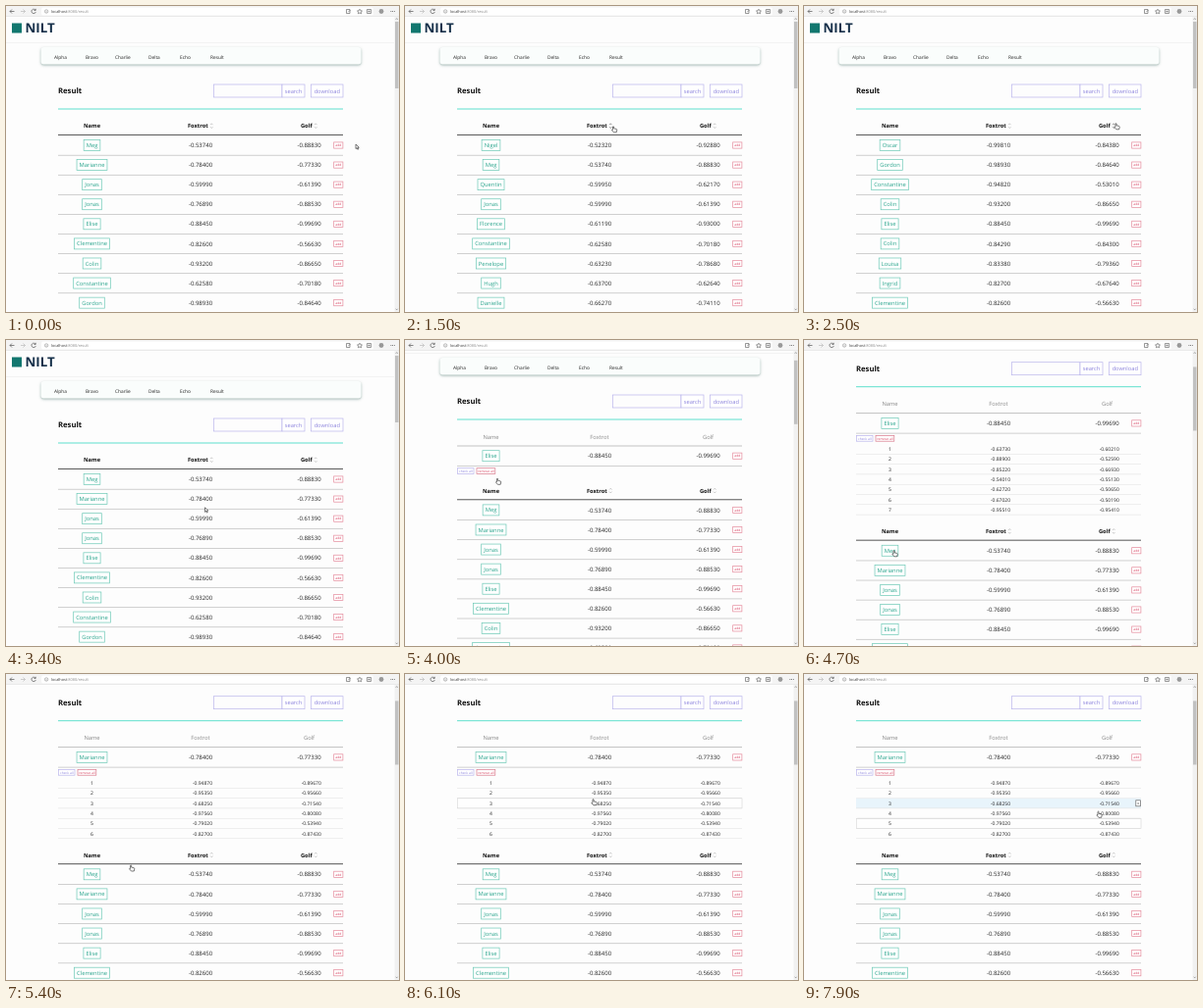
An HTML page with a canvas for the animation above (8000 ms loop, 400 px wide and 312 px high).

```html
<!DOCTYPE html>
<html lang="en">
<head>
<meta charset="utf-8">
<title>Result table</title>
<style>
html, body { margin: 0; width: 100%; height: 100%; overflow: hidden; background: #fdfdfd; }
canvas { display: block; width: 400px; height: 312px; }
</style>
</head>
<body>
<canvas id="stage"></canvas>
<script>
const W = 400, H = 312, LOOP = 8000;
const canvas = document.getElementById('stage');
const ratio = window.devicePixelRatio || 1;
canvas.width = W * ratio;
canvas.height = H * ratio;
const ctx = canvas.getContext('2d');
const FONT = '"Open Sans", "Noto Sans", sans-serif';

const LEFT = 53, RIGHT = 343, NAME_X = 87.5, FOX_X = 198, GOLF_X = 308.5;
const TEAL = '#27a38b', VIOLET = '#8c83dc', RED = '#d6405f';

const rows = `Meg 53740 88830
Marianne 78400 77330
Jonas 59990 61390
Jonas 76890 88530
Elise 88450 99690
Clementine 82600 56630
Colin 93200 86650
Constantine 62580 70180
Gordon 98930 84640
Nigel 52320 92880
Quentin 59950 62170
Florence 61190 93000
Penelope 63230 78680
Hugh 63700 62640
Danielle 66270 74110
Oscar 99810 84380
Constantine 94820 53010
Colin 84290 84300
Louisa 83380 79360
Ingrid 82700 67640`.split('\n').map(line => line.split(' '));

const pairs = text => text.split(', ').map(p => p.split(' '));
const details = {
  Elise: pairs('63730 60210, 88900 52590, 85220 66930, 54010 55130, 62720 50650, 67020 50190, 95510 95410'),
  Marianne: pairs('94870 89670, 95350 95660, 68250 71540, 97560 80080, 79020 53940, 82700 87430')
};

// Each cue: [start time, value]
const sorts = [[0, null], [1200, [1, 1]], [1900, [1, -1]], [2700, [2, 1]], [3000, [2, -1]], [3200, null]];
const picks = [[0, null], [3600, 'Elise'], [5100, 'Marianne']];
const hovers = [[0, 0], [5600, 3], [6800, 4], [7100, 5], [7400, 6], [7700, 5]];
const hands = [[0, false], [800, true], [2000, false], [2500, true], [3300, false], [3600, true]];
const icons = [[0, 0], [1000, 1], [2000, 0], [2500, 2], [3300, 0]];

const scrollPath = [[0, 0], [3700, 0], [4000, 24], [4100, 30], [4400, 57.3]];
const cursorPath = [
  [0, 356, 141], [200, 340, 149], [800, 211.5, 122.5], [1900, 211.5, 122.5],
  [2500, 317, 119.5], [3200, 317, 119.5], [3600, 88, 222], [3700, 88, 222],
  [4000, 93.5, 141], [4700, 91, 214.5], [5000, 88, 232], [5100, 88, 232],
  [5800, 178, 145], [6100, 191, 127.5], [6300, 191, 127.5], [7200, 338, 151],
  [7400, 344, 156], [7900, 299, 140]
];

function cue(list, t) {
  let value;
  for (const [start, v] of list) if (t >= start) value = v;
  return value;
}

function along(path, t, k = 1) {
  const i = path.findIndex(p => p[0] > t);
  if (i < 0) return path[path.length - 1][k];
  const a = path[i - 1], b = path[i];
  return a[k] + (b[k] - a[k]) * (t - a[0]) / (b[0] - a[0]);
}

function label(str, x, y, size, color, align = 'center', weight = 400) {
  ctx.font = `${weight} ${size}px ${FONT}`;
  ctx.textAlign = align;
  ctx.fillStyle = color;
  ctx.fillText(str, x, y + size * 0.36);
}

function fill(x, y, w, h, color) {
  ctx.fillStyle = color;
  ctx.fillRect(x, y, w, h);
}

function frame(x, y, w, h, color, line = 0.7) {
  ctx.strokeStyle = color;
  ctx.lineWidth = line;
  ctx.strokeRect(x, y, w, h);
}

function rule(y, color, h = 0.7) {
  fill(LEFT, y - h / 2, RIGHT - LEFT, h, color);
}

function stroke(d, color, line = 0.7) {
  ctx.strokeStyle = color;
  ctx.lineWidth = line;
  ctx.stroke(new Path2D(d));
}

function tag(str, x, y, w, h, size, color, border) {
  fill(x, y - h / 2, w, h, '#fff');
  frame(x, y - h / 2, w, h, border);
  label(str, x + w / 2, y, size, color);
}

function sortIcon(x, y, active) {
  const c = active ? '#555' : '#aaa';
  stroke(`M${x - 1.2} ${y - 1}l1.2-1.4 1.2 1.4M${x - 1.2} ${y + 1}l1.2 1.4 1.2-1.4`, c, 0.6);
}

function tableRow([name, fox, golf], y) {
  ctx.font = `400 5.8px ${FONT}`;
  const w = ctx.measureText(name).width + 5;
  tag(name, NAME_X - w / 2, y, w, 11, 5.8, TEAL, '#6cc9b6');
  label('-0.' + fox, FOX_X, y, 6, '#222');
  label('-0.' + golf, GOLF_X, y, 6, '#222');
  tag('add', 333.7, y, 9.2, 6.2, 3.4, RED, '#e58a9c');
  rule(y + 10.2, '#bdbdbd');
}

function siteHeader() {
  fill(6, 17.5, 10, 10, '#12776f');
  label('NILT', 19.5, 22.5, 13.3, '#16304a', 'left', 700);
  fill(0, 37.3, 395, 0.6, '#ececec');
  ctx.save();
  ctx.shadowColor = 'rgba(40,90,80,.45)';
  ctx.shadowBlur = 2.5 * ratio;
  ctx.shadowOffsetY = ratio;
  ctx.fillStyle = '#fafdfc';
  ctx.beginPath();
  ctx.roundRect(35.5, 42, 326, 17.5, 3);
  ctx.fill();
  ctx.restore();
  const links = { Alpha: 49, Bravo: 81, Charlie: 111, Delta: 145, Echo: 177, Result: 208 };
  for (const name in links) label(name, links[name], 52, 4.8, '#222', 'left');
}

function toolbar() {
  label('Result', LEFT, 86.7, 7.7, '#111', 'left', 700);
  frame(211.5, 80, 69.5, 13, '#b9b4ec');
  tag('search', 281, 86.5, 23, 13, 5.7, VIOLET, '#b9b4ec');
  tag('download', 310.5, 86.5, 32.5, 13, 5.7, VIOLET, '#b9b4ec');
  rule(105, '#5fe0cd', 1);
}

function detailRow([fox, golf], i, t) {
  const y = 168.5 + 10.3 * i, n = i + 1;
  const marked = n === 3 && t >= 6400;
  if (marked) fill(LEFT, y - 5, RIGHT - LEFT, 10, '#e8f4fb');
  rule(y + 5.1, '#dedede', 0.5);
  if (cue(hovers, t) === n) {
    ctx.save();
    ctx.shadowColor = 'rgba(0,0,0,.2)';
    ctx.shadowBlur = 1.5 * ratio;
    fill(LEFT + 0.5, y - 5, RIGHT - LEFT - 0.5, 10, marked ? '#e8f4fb' : '#fefefe');
    ctx.restore();
    frame(LEFT + 0.5, y - 5, RIGHT - LEFT - 0.5, 10, '#d8d8d8', 0.6);
  }
  label(n, NAME_X, y, 5, '#222');
  label('-0.' + fox, 200, y, 5, '#222');
  label('-0.' + golf, 310.7, y, 5, '#222');
  if (marked) tag('x', 337.8, y, 4.8, 6, 3.6, '#333', '#666');
}

function panel(name, t) {
  label('Name', NAME_X, 122.5, 5.8, '#888');
  label('Foxtrot', FOX_X, 122.5, 5.8, '#888');
  label('Golf', GOLF_X, 122.5, 5.8, '#888');
  rule(132, '#aaa');
  tableRow(rows.find(r => r[0] === name), 142.2);
  tag('check all', 53.5, 157.6, 16.5, 5.8, 3.4, VIOLET, '#b9b4ec');
  tag('remove all', 73, 157.6, 18.8, 5.8, 3.4, RED, '#d9788b');
  if (t < 4100) return 177.6;
  const list = details[name];
  list.forEach((pair, i) => detailRow(pair, i, t));
  return 179.1 + 10.45 * list.length;
}

function mainTable(top, t) {
  const icon = cue(icons, t);
  label('Name', NAME_X, top, 5.7, '#111', 'center', 700);
  label('Foxtrot', 185, top, 5.7, '#111', 'left', 700);
  label('Golf', 300, top, 5.7, '#111', 'left', 700);
  sortIcon(209.3, top, icon === 1);
  sortIcon(315.3, top, icon === 2);
  rule(top + 9.2, '#444', 0.9);
  const order = cue(sorts, t);
  const list = order
    ? [...rows].sort((a, b) => (a[order[0]] - b[order[0]]) * order[1])
    : rows;
  list.forEach((row, i) => tableRow(row, top + 19.8 + 20.08 * i));
}

function browserBar() {
  fill(0, 0, W, 10.8, '#f4f4f4');
  ctx.fillStyle = '#fff';
  ctx.beginPath();
  ctx.roundRect(36, 1.5, 338, 8, 2);
  ctx.fill();
  fill(0, 10.4, W, 0.5, '#dcdcdc');
  stroke('M8.5 5.5H4M6 3.5L4 5.5l2 2', '#555');
  stroke('M15 5.5h4.5M17.5 3.5l2 2-2 2', '#bbb');
  stroke('M30 4.2A2.2 2.2 0 1 0 30.3 6M30.2 2.8v1.7h-1.7', '#555');
  stroke('M42.8 5.5a1.7 1.7 0 1 0-3.4 0a1.7 1.7 0 1 0 3.4 0M41.1 5.2v1.2', '#777', 0.5);
  label('localhost', 46, 5.6, 3.9, '#333', 'left');
  const x = 46 + ctx.measureText('localhost').width;
  label(':8080/result', x, 5.6, 3.9, '#888', 'left');
  stroke('M346.5 3.5h3.5v4h-3.5zM348.5 6l2-2', '#555', 0.6);
  stroke('M360 3.2l.8 1.5 1.7.2-1.2 1.2.3 1.7-1.6-.8-1.6.8.3-1.7-1.2-1.2 1.7-.2z', '#555', 0.6);
  stroke('M367.5 3.5h4v4h-4zM369.5 4.5v2M368.5 5.5h2', '#555', 0.6);
  ctx.fillStyle = '#999';
  ctx.beginPath();
  ctx.arc(382, 5.5, 2.4, 0, 7);
  ctx.fill();
  for (let i = 0; i < 3; i++) fill(391.5 + i * 1.7, 5.2, 0.8, 0.8, '#444');
}

function scrollbar(scroll, open) {
  fill(395.5, 10.8, 4.5, H - 10.8, '#f1f1f1');
  fill(396, 16 + scroll * 0.2, 3.5, open ? 65 : 68, '#c1c1c1');
  stroke('M396.7 13.8l1-1.2 1 1.2M396.7 308.7l1 1.2 1-1.2', '#777', 0.6);
}

function cursor(x, y, hand) {
  ctx.save();
  ctx.translate(x, y);
  const shape = new Path2D(hand
    ? 'M0 .5Q.6-.3 1.1 .5V2.4L3.6 2.9Q4.3 3.1 4.2 4L3.7 6.3H.9L-1 4.1Q-1 3.2 0 3.7Z'
    : 'M0 0V4.6L1.1 3.6 1.9 5.3 2.7 4.9 1.9 3.3H3.3Z');
  ctx.fillStyle = '#fff';
  ctx.fill(shape);
  ctx.strokeStyle = '#222';
  ctx.lineWidth = 0.6;
  ctx.stroke(shape);
  ctx.restore();
}

function draw(t) {
  const scroll = along(scrollPath, t);
  const pick = cue(picks, t);
  ctx.setTransform(ratio, 0, 0, ratio, 0, 0);
  ctx.textRendering = 'geometricPrecision';
  fill(0, 0, W, H, '#fdfdfd');
  ctx.save();
  ctx.translate(0, -scroll);
  siteHeader();
  toolbar();
  mainTable(pick ? panel(pick, t) : 122.2, t);
  ctx.restore();
  scrollbar(scroll, pick);
  browserBar();
  cursor(along(cursorPath, t, 1), along(cursorPath, t, 2), cue(hands, t));
}

const begin = performance.now();
function tick() {
  const t = (performance.now() - begin) % LOOP;
  draw(Math.floor(t / 100) * 100);
  requestAnimationFrame(tick);
}
tick();
</script>
</body>
</html>
```
